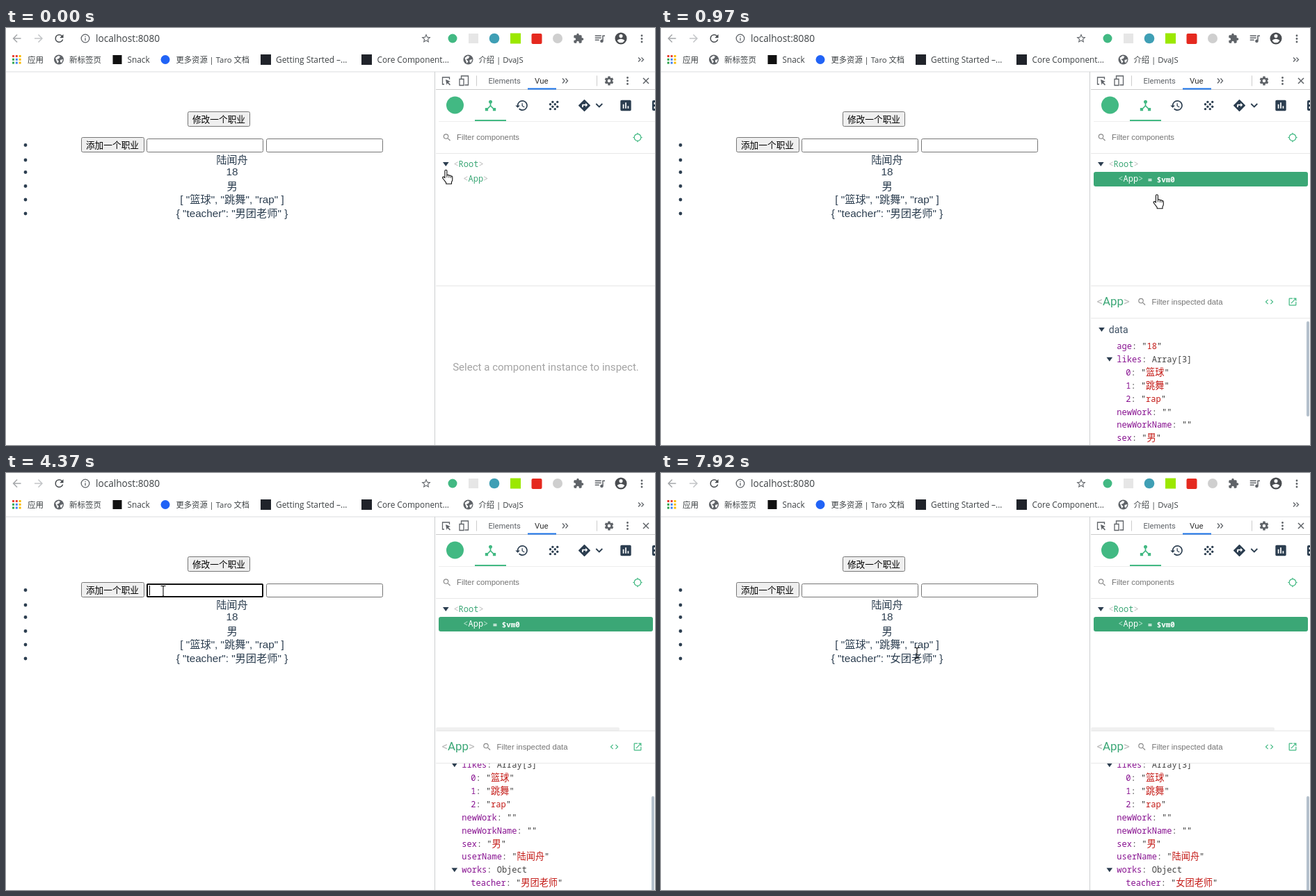
Recreate the animation shown at these times as an HTML page. Size 933 by 600 pixels, loop 8 s.

```html
<!DOCTYPE html>
<html lang="zh-CN">
<head>
<meta charset="utf-8">
<title>Component inspector</title>
<style>
  html, body { margin: 0; width: 100%; height: 100%; overflow: hidden; background: #fff; }
  svg { display: block; width: 933px; height: 600px; }
  text { white-space: pre; }
  .ui { font-family: "Open Sans", "Noto Sans CJK SC", sans-serif; }
  .page { font-family: "Liberation Sans", "Noto Sans CJK SC", sans-serif; }
  .rob { font-family: Roboto, "Noto Sans CJK SC", sans-serif; }
  .mono { font-family: "Noto Sans Mono", "Noto Sans CJK SC", monospace; }
</style>
</head>
<body>
<svg id="stage" viewBox="0 0 933 600" xmlns="http://www.w3.org/2000/svg"></svg>
<script>
const INK = '#2c3e50', GREEN = '#42b983', GREY = '#5f6368';
const PERSON = '陆闻舟';
const LOOP = 8000;

const ICONS = {
  back: 'M20 11H7.83l5.59-5.59L12 4l-8 8 8 8 1.41-1.41L7.83 13H20z',
  next: 'M4 11h12.17l-5.59-5.59L12 4l8 8-8 8-1.41-1.41L16.17 13H4z',
  reload: 'M17.65 6.35A7.96 7.96 0 0 0 12 4a8 8 0 1 0 7.73 10h-2.08A6 6 0 1 1 12 6c1.66 0 3.14.69 4.22 1.78L13 11h7V4z',
  info: 'M11 17h2v-6h-2zm1-15a10 10 0 1 0 0 20 10 10 0 0 0 0-20zm0 18a8 8 0 1 1 0-16 8 8 0 0 1 0 16zM11 9h2V7h-2z',
  star: 'M22 9.24l-7.19-.62L12 2 9.19 8.63 2 9.24l5.46 4.73L5.82 21 12 17.27 18.18 21l-1.63-7.03zM12 15.4l-3.76 2.27 1-4.28-3.32-2.88 4.38-.38L12 6.1l1.71 4.04 4.38.38-3.32 2.88 1 4.28z',
  puzzle: 'M20.5 11H19V7c0-1.1-.9-2-2-2h-4V3.5a2.5 2.5 0 0 0-5 0V5H4c-1.1 0-2 .9-2 2v3.8h1.5a2.7 2.7 0 0 1 0 5.4H2V20c0 1.1.9 2 2 2h3.8v-1.5a2.7 2.7 0 0 1 5.4 0V22H17c1.1 0 2-.9 2-2v-4h1.5a2.5 2.5 0 0 0 0-5z',
  music: 'M15 6H3v2h12V6zm0 4H3v2h12v-2zM3 16h8v-2H3v2zM17 6v8.18A3 3 0 1 0 19 17V8h3V6z',
  user: 'M12 2a10 10 0 1 0 0 20 10 10 0 0 0 0-20zm0 3a3 3 0 1 1 0 6 3 3 0 0 1 0-6zm0 14.2a7.2 7.2 0 0 1-6-3.22c.03-1.99 4-3.08 6-3.08s5.97 1.09 6 3.08a7.2 7.2 0 0 1-6 3.22z',
  gear: 'M19.43 12.98c.04-.32.07-.64.07-.98s-.03-.66-.07-.98l2.11-1.65c.19-.15.24-.42.12-.64l-2-3.46c-.12-.22-.39-.3-.61-.22l-2.49 1c-.52-.4-1.08-.73-1.69-.98l-.38-2.65A.49.49 0 0 0 14 2h-4c-.25 0-.46.18-.49.42l-.38 2.65c-.61.25-1.17.59-1.69.98l-2.49-1c-.23-.09-.49 0-.61.22l-2 3.46c-.13.22-.07.49.12.64l2.11 1.65c-.04.32-.07.65-.07.98s.03.66.07.98l-2.11 1.65c-.19.15-.24.42-.12.64l2 3.46c.12.22.39.3.61.22l2.49-1c.52.4 1.08.73 1.69.98l.38 2.65c.03.24.24.42.49.42h4c.25 0 .46-.18.49-.42l.38-2.65c.61-.25 1.17-.59 1.69-.98l2.49 1c.23.09.49 0 .61-.22l2-3.46c.12-.22.07-.49-.12-.64zM12 15.5a3.5 3.5 0 1 1 0-7 3.5 3.5 0 0 1 0 7z',
  search: 'M15.5 14h-.79l-.28-.27A6.47 6.47 0 0 0 16 9.5 6.5 6.5 0 1 0 9.5 16c1.61 0 3.09-.59 4.23-1.57l.27.28v.79l5 4.99L20.49 19zm-6 0a4.5 4.5 0 1 1 0-9 4.5 4.5 0 0 1 0 9z',
  hub: 'M17 16l-4-4V8.82a3 3 0 1 0-2 0V12l-4 4H3v5h5v-3.05l4-4.2 4 4.2V21h5v-5z',
  history: 'M13 3a9 9 0 0 0-9 9H1l3.89 3.89.07.14L9 12H6a7 7 0 1 1 2.06 4.94l-1.42 1.42A9 9 0 1 0 13 3zm-1 5v5l4.28 2.54.72-1.21-3.5-2.08V8z',
  route: 'M21.71 11.29l-9-9a1 1 0 0 0-1.41 0l-9 9a1 1 0 0 0 0 1.41l9 9c.39.39 1.02.39 1.41 0l9-9a1 1 0 0 0 0-1.41zM14 14.5V12h-4v3H8v-4c0-.55.45-1 1-1h5V7.5l3.5 3.5z',
  chart: 'M19 3H5c-1.1 0-2 .9-2 2v14c0 1.1.9 2 2 2h14c1.1 0 2-.9 2-2V5c0-1.1-.9-2-2-2zM9 17H7v-7h2v7zm4 0h-2V7h2v10zm4 0h-2v-4h2v4z',
  aim: 'M20.94 11A9 9 0 0 0 13 3.06V1h-2v2.06A9 9 0 0 0 3.06 11H1v2h2.06A9 9 0 0 0 11 20.94V23h2v-2.06A9 9 0 0 0 20.94 13H23v-2zM12 19a7 7 0 1 1 0-14 7 7 0 0 1 0 14z',
  code: 'M9.4 16.6L4.8 12l4.6-4.6L8 6l-6 6 6 6zm5.2 0l4.6-4.6-4.6-4.6L16 6l6 6-6 6z',
  open: 'M19 19H5V5h7V3H5a2 2 0 0 0-2 2v14a2 2 0 0 0 2 2h14a2 2 0 0 0 2-2v-7h-2v7zM14 3v2h3.59l-9.83 9.83 1.41 1.41L19 6.41V10h2V3z',
  eye: 'M12 4.5C7 4.5 2.73 7.61 1 12c1.73 4.39 6 7.5 11 7.5s9.27-3.11 11-7.5c-1.73-4.39-6-7.5-11-7.5zM12 17a5 5 0 1 1 0-10 5 5 0 0 1 0 10zm0-8a3 3 0 1 0 0 6 3 3 0 0 0 0-6z'
};

// Markup helpers
const esc = s => s.replace(/&/g, '&amp;').replace(/</g, '&lt;').replace(/>/g, '&gt;');
const text = (cls, x, y, size, fill, s, more = '') =>
  `<text class="${cls}" x="${x}" y="${y}" font-size="${size}" fill="${fill}" ${more}>${esc(s)}</text>`;
const mid = 'text-anchor="middle"';
const rect = (x, y, w, h, fill, more = '') =>
  `<rect x="${x}" y="${y}" width="${w}" height="${h}" fill="${fill}" ${more}/>`;
const dot = (x, y, r, fill, more = '') => `<circle cx="${x}" cy="${y}" r="${r}" fill="${fill}" ${more}/>`;
const line = (d, color, w = 1.3) => `<path d="${d}" fill="none" stroke="${color}" stroke-width="${w}"/>`;
const icon = (name, x, y, size, fill) =>
  `<path transform="translate(${x - size / 2} ${y - size / 2}) scale(${size / 24})" d="${ICONS[name]}" fill="${fill}" fill-rule="evenodd"/>`;
const kebab = (x, y) => [-4.5, 0, 4.5].map(d => dot(x, y + d, 1.4, GREY)).join('');
const down = (x, y) => `<path d="M${x - 4.3} ${y - 3}h8.6l-4.3 6z" fill="${INK}"/>`;
const group = (id, body, more = '') => `<g id="${id}" ${more}>${body}</g>`;
const spans = parts => parts.map(([fill, s]) => `<tspan fill="${fill}">` +
  esc(s).replace(/[\u4e00-\u9fff]+/g, m => `<tspan font-size="13.2">${m}</tspan>`) + '</tspan>').join('');
const mono = (x, y, parts, size = 12) =>
  `<text class="mono" x="${x}" y="${y}" font-size="${size}">${spans(parts)}</text>`;
const tag = (x, y, name, fill, edge, size) => mono(x, y, [[edge, '<'], [fill, name], [edge, '>']], size);
const globe = x => dot(x, 45.5, 7, GREY) +
  `<path d="M${x - 5} 43l4-3 3 1-2 3-3 1 3 3-2 3zM${x + 2} 46l4-1-2 5-2-1z" fill="#fff"/>`;

function browserBar() {
  const apps = ['#ea4335', '#ea4335', '#fbbc05', '#34a853', '#4285f4', '#fbbc05', '#34a853', '#4285f4', '#fbbc05'];
  const marks = [[31, 11.5, '应用'], [91, 11.5, '新标签页'], [174.5, 11.8, 'Snack'], [244.5, 11.3, '更多资源 | Taro 文档'],
    [388, 11.9, 'Getting Started –...'], [533.5, 11.8, 'Core Component...'], [679.5, 11.3, '介绍 | DvaJS']];
  return icon('back', 15.5, 15, 18, '#a5a8ab') + icon('next', 47, 15, 18, '#c3c5c8') +
    icon('reload', 76.5, 15, 18, '#45494d') + icon('info', 114, 15, 15.5, GREY) +
    text('ui', 129, 20, 13.65, '#3c4043', 'localhost:8080') + icon('star', 604, 15, 16, GREY) +
    dot(642, 15, 6.5, GREEN) + rect(665, 8, 14, 14, '#e6e6e6') + dot(702, 15, 7.3, '#3f9fb5') +
    rect(725, 7.5, 15, 15, '#9be800') + rect(755.5, 8, 15, 15, '#e5291f', 'rx="2"') + dot(793, 15, 7, '#cfcfcf') +
    icon('puzzle', 823, 15, 16, GREY) + icon('music', 853.5, 15, 18, GREY) + icon('user', 884, 15, 20.5, '#4a4d51') + kebab(914, 15.5) +
    apps.map((c, i) => rect(9 + i % 3 * 4.8, 39 + (i / 3 | 0) * 4.8, 3, 3, c)).join('') +
    globe(76) + globe(664.5) + rect(153.5, 39, 13, 13, '#111') + dot(229, 45.5, 6.5, '#2163f6') +
    rect(366, 38, 15, 15, '#20232a') + rect(511, 38, 15, 15, '#20232a') +
    marks.map(([x, s, t]) => text('ui', x, 50, s, '#3c4043', t)).join('') +
    line('M909 42.5l3 3-3 3M913.5 42.5l3 3-3 3', GREY) + rect(0, 62.5, 933, 1, '#dcdee0');
}

function page() {
  const rows = [[195, PERSON], [212, '18'], [232.5, '男'], [251.5, '[ "篮球", "跳舞", "rap" ]']];
  const box = (id, x, y, w, h, fill) => rect(x + .5, y + .5, w - 1, h - 1, fill, `id="${id}" stroke="#767676" rx="2"`);
  return box('edit', 261, 120, 90, 22, '#efefef') + text('page', 306, 136.3, 12.7, '#000', '修改一个职业', mid) +
    box('add', 108, 157, 91, 22, '#efefef') + text('page', 153, 173.3, 12.7, '#000', '添加一个职业', mid) +
    box('field', 202, 159, 168, 20, '#fff') + box('field2', 374, 159, 168, 20, '#fff') +
    rect(203, 160, 166, 18, 'none', 'id="ring" stroke="#101010" stroke-width="2" rx="1"') +
    rect(206, 162, 1, 14, '#000', 'id="caret"') +
    [168.5, 190, 207.5, 227.5, 247, 267].map(y => dot(28, y, 2.4, INK)).join('') +
    rows.map(([y, s]) => text('page', 325, y, 15.25, INK, s, mid)).join('') +
    text('page', 325, 271.5, 15.25, INK, '', mid + ' id="works"') +
    group('overlay', rect(3, 120, 606, 155, 'rgba(104,182,255,.35)', 'rx="2"') +
      rect(289, 189, 34, 17, 'rgba(96,176,252,.95)', 'rx="2"') + tag(292, 201.5, 'App', '#fff', '#c9e8f0', 9.7));
}

function toolbar() {
  // Checkerboard of dots on a 4 by 4 grid
  const grain = [0, 1, 2, 3].map(r => [0, 2].map(c =>
    dot(782.5 + (c + (r + 1) % 2) * 3.4, 106.4 + r * 3.4, 1.7, INK)).join('')).join('');
  return rect(616, 63, 1, 537, '#cdcfd1') +
    line('M630 81h-2.5v-10h10v3', GREY) + `<path d="M632 74l7 3-3 1 3 3.5-1.2 1-3-3.3-1.3 2.8z" fill="${GREY}"/>` +
    line('M654.5 73v-4h10v13h-5M652 73.5h6v9h-6z', GREY) +
    rect(676, 68.5, 1, 15, '#ccc') + text('rob', 693.5, 80.3, 11.2, GREY, 'Elements') +
    text('rob', 760, 80.3, 11.5, '#333', 'Vue') + line('M800 72.5l3 3.5-3 3.5M804.5 72.5l3 3.5-3 3.5', GREY) +
    rect(849, 68.5, 1, 15, '#ccc') + icon('gear', 867, 76, 15.5, GREY) + kebab(893.5, 76) +
    line('M916 72l8 8M924 72l-8 8', GREY, 1.5) +
    rect(618, 88, 315, 1, '#ccc') + rect(750, 86.5, 41, 2, '#1a73e8') +
    dot(645.5, 111, 12.5, GREEN) + icon('hub', 696.5, 111.5, 20.5, GREEN) +
    icon('history', 741.5, 111.5, 20, INK) + grain + icon('route', 831.5, 111.5, 20.5, INK) +
    line('M848.3 109l4.5 4.5 4.5-4.5', INK, 1.8) + icon('chart', 891, 111.5, 20.5, INK) +
    `<path d="M933 104h-2q-2 0-2 2v11q0 2 2 2h2v-3h-1.5v-3h1.5v-3h-1.5v-3h1.5z" fill="${INK}"/>` +
    rect(622, 134, 311, 1, '#eee') + rect(674, 132, 45, 2, GREEN);
}

function tree() {
  return icon('search', 634, 157.5, 14, '#888') + text('page', 648, 161.3, 11.33, '#757575', 'Filter components') +
    icon('aim', 908, 157.5, 14.5, GREEN) +
    rect(618, 180, 315, 1, '#e8e8e8') + down(632.3, 196) + tag(643.4, 200.3, 'Root', '#3ba776', '#bbb') +
    group('plain', tag(657.3, 221.3, 'App', '#3ba776', '#bbb')) +
    group('picked', rect(622, 207, 308, 21, '#3ba776', 'rx="3"') + tag(657.3, 221.3, 'App', '#fff', '#b5e3cd') +
      text('mono', 699.8, 221.8, 10.8, '#fff', '= $vm0', 'font-weight="600"')) +
    group('eye', icon('eye', 917, 217.5, 15, '#fff')) +
    rect(618, 366, 264, 5, '#f0f0f0', 'id="bar" rx="2"') + rect(618, 370.5, 315, 1, '#e4e4e4');
}

function inspector() {
  const KEY = '#881391', DARK = '#333', RED = '#c41a16';
  const str = s => [[DARK, '"'], [RED, s], [DARK, '"']];
  const rows = [
    [0, 'age', str('18')], [0, 'likes', [['#444', 'Array[3]']], 1],
    [1, '0', str('篮球')], [1, '1', str('跳舞')], [1, '2', str('rap')],
    [0, 'newWork', str('')], [0, 'newWorkName', str('')], [0, 'sex', str('男')],
    [0, 'userName', str(PERSON)], [0, 'works', [['#444', 'Object']], 1], [1, 'teacher', str('男团老师')]
  ];
  const list = rows.map(([deep, key, val, open], i) => {
    const y = 458 + i * 18.87, row = [[KEY, key], ['#555', ': '], ...val];
    const body = (open ? down(644.8, y) : '') + mono(655.3 + deep * 13, y + 4.2, row);
    return key === 'teacher' ? group('teacher', body) : body;
  }).join('');
  return group('empty', text('rob', 776, 493.3, 15.05, '#a3a3a3', 'Select a component instance to inspect.', mid)) +
    group('detail',
      `<text class="rob" x="626.5" y="399" font-size="16.9">${spans([['#bbb', '<'], ['#3ba776', 'App'], ['#bbb', '>']])}</text>` +
      icon('search', 691.5, 394, 14, '#888') + text('page', 705.5, 397.8, 11.33, '#757575', 'Filter inspected data') +
      icon('code', 874.5, 394, 14, GREEN) + icon('open', 908, 394, 14.5, GREEN) + rect(618, 417, 315, 1, '#e8e8e8') +
      `<g clip-path="url(#view)">` +
      group('rows', down(633.5, 434) + text('rob', 643.8, 438.6, 14, '#3d5063', 'data') + list) +
      rect(928, 422, 4, 137, '#b4c0cc', 'id="thumb" rx="2"') + '</g>');
}

function tooltip() {
  const bold = (x, y, s) => text('rob', x, y, 11.3, '#fff', s, 'font-weight="500"');
  const row = (y, key, w, label) => rect(713, y - 9, w, 18, '#56646f', 'rx="3"') + bold(716, y + 4, key) +
    bold(716 + w, y + 4, '+') + rect(727 + w, y - 5, 10, 13, '#939ba3', 'rx="4.5"') +
    line(`M${727 + w} ${y}h10M${732 + w} ${y - 5}v5`, INK, 1) + bold(740 + w, y + 4, ': ' + label);
  return group('tip', rect(701, 308, 140, 54, INK, 'rx="5"') + `<path d="M766 361.5h10l-5 5z" fill="${INK}"/>` +
    row(323, 'Ctrl', 25, 'Collapse All') + row(344, 'Shift', 31, 'Expand All'));
}

// Each pointer has its hot spot at 0,0
function pointers() {
  const edge = 'fill="#fff" stroke="#111" stroke-width="1.1" stroke-linejoin="round"';
  return group('hand', `<path d="M-1.6 1.2q0-1.5 1.5-1.5t1.5 1.5v6q2.5-1 3 .6q2-.8 2.7.7q2-.3 2.2 1.5v3.5q0 2-1.3 3.6v2.6h-7.8v-1.6l-4.2-5.6q-1.6-2-.3-2.7t2.7 1.4z" ${edge}/>` +
      line('M1.4 7v3.5M4.4 8v3M7.1 8.7v2.6', '#111', .9)) +
    group('arrow', `<path d="M0 0v15.5l3.6-3.4 2.5 6 2.4-1-2.5-5.8h5z" ${edge}/>`) +
    group('beam', line('M-3.5-7.5h2.5l1 1 1-1h2.5M0-6.5v13M-3.5 7.5h2.5l1-1 1 1h2.5', '#111', 1.1));
}

const $ = id => document.getElementById(id);
$('stage').innerHTML = '<defs><clipPath id="view"><rect x="618" y="418" width="315" height="182"/></clipPath></defs>' +
  rect(0, 0, 933, 600, '#fff') + browserBar() + page() + toolbar() + tree() + inspector() + tooltip() + pointers();

// Pointer steps: time, shape, x, y
const PATH = [
  [0, 'hand', 632.5, 204.5], [140, 'hand', 641, 207], [280, 'hand', 664, 212], [415, 'hand', 690, 215], [550, 'hand', 703, 216],
  [690, 'hand', 706, 216], [970, 'hand', 713, 240], [1110, 'arrow', 722, 330], [1250, 'arrow', 727, 395],
  [1385, 'hand', 727, 423], [1520, 'hand', 728, 424],
  [2510, 'hand', 728, 422], [2650, 'hand', 726, 420], [2790, 'hand', 718, 418], [2930, 'arrow', 640, 350],
  [3070, 'arrow', 430, 240], [3200, 'beam', 307, 174], [3350, 'beam', 292, 173],
  [3660, 'beam', 280, 172], [3800, 'beam', 256, 171], [3950, 'beam', 236, 170], [4090, 'beam', 228, 170],
  [4370, 'beam', 226, 170], [4520, 'beam', 228, 170],
  [4820, 'beam', 240, 166], [4960, 'arrow', 272, 148], [5090, 'arrow', 291.5, 126.5],
  [6700, 'arrow', 325, 165], [6840, 'arrow', 440, 290], [6970, 'arrow', 620, 440], [7100, 'arrow', 800, 540],
  [7230, 'arrow', 870, 572], [7370, 'arrow', 850, 577], [7500, 'arrow', 832, 570], [7630, 'arrow', 818, 539],
  [7780, 'arrow', 560, 390], [7920, 'beam', 368, 259]
];
const SCROLL = [[0, 0], [1250, 10], [1385, 34], [1520, 56.7]];
const BAR = [[0, 0], [1385, 18], [2650, 264]];

const at = (steps, t) => steps.reduce((now, s) => s[0] <= t ? s : now);
const show = (id, on) => $(id).setAttribute('visibility', on ? 'visible' : 'hidden');
const set = (id, attrs) => { for (const k in attrs) $(id).setAttribute(k, attrs[k]); };
const within = (t, a, b) => t >= a && t < b;
const teacherText = $('teacher').querySelector('tspan tspan');

function draw(t) {
  const [, shape, x, y] = at(PATH, t);
  for (const id of ['hand', 'arrow', 'beam']) show(id, id === shape);
  set(shape, { transform: `translate(${x} ${y})` });

  const picked = t >= 550;
  show('plain', !picked);
  show('picked', picked);
  show('empty', !picked);
  show('detail', picked);
  show('eye', within(t, 550, 970));
  show('overlay', within(t, 280, 970));
  show('tip', within(t, 2650, 3350));

  const scroll = at(SCROLL, t)[1];
  set('rows', { transform: `translate(0 ${-scroll})` });
  set('thumb', { y: 422 + scroll * .76 });
  set('bar', { width: at(BAR, t)[1] });

  set('field', { stroke: within(t, 3200, 4960) ? '#3c3c3c' : '#767676' });
  show('ring', within(t, 4090, 6090));
  show('caret', within(t, 4090, 4670) || within(t, 5090, 5660));

  const hover = within(t, 5090, 6700), press = within(t, 6090, 6230);
  set('edit', { fill: press ? '#f5f5f5' : hover ? '#e5e5e5' : '#efefef', stroke: hover ? '#4f4f4f' : '#767676' });

  const role = (t >= 6230 ? '女' : '男') + '团老师';
  $('works').textContent = `{ "teacher": "${role}" }`;
  teacherText.textContent = role;
}

const start = performance.now();
function tick() {
  draw((performance.now() - start) % LOOP);
  requestAnimationFrame(tick);
}
tick();
</script>
</body>
</html>
```
